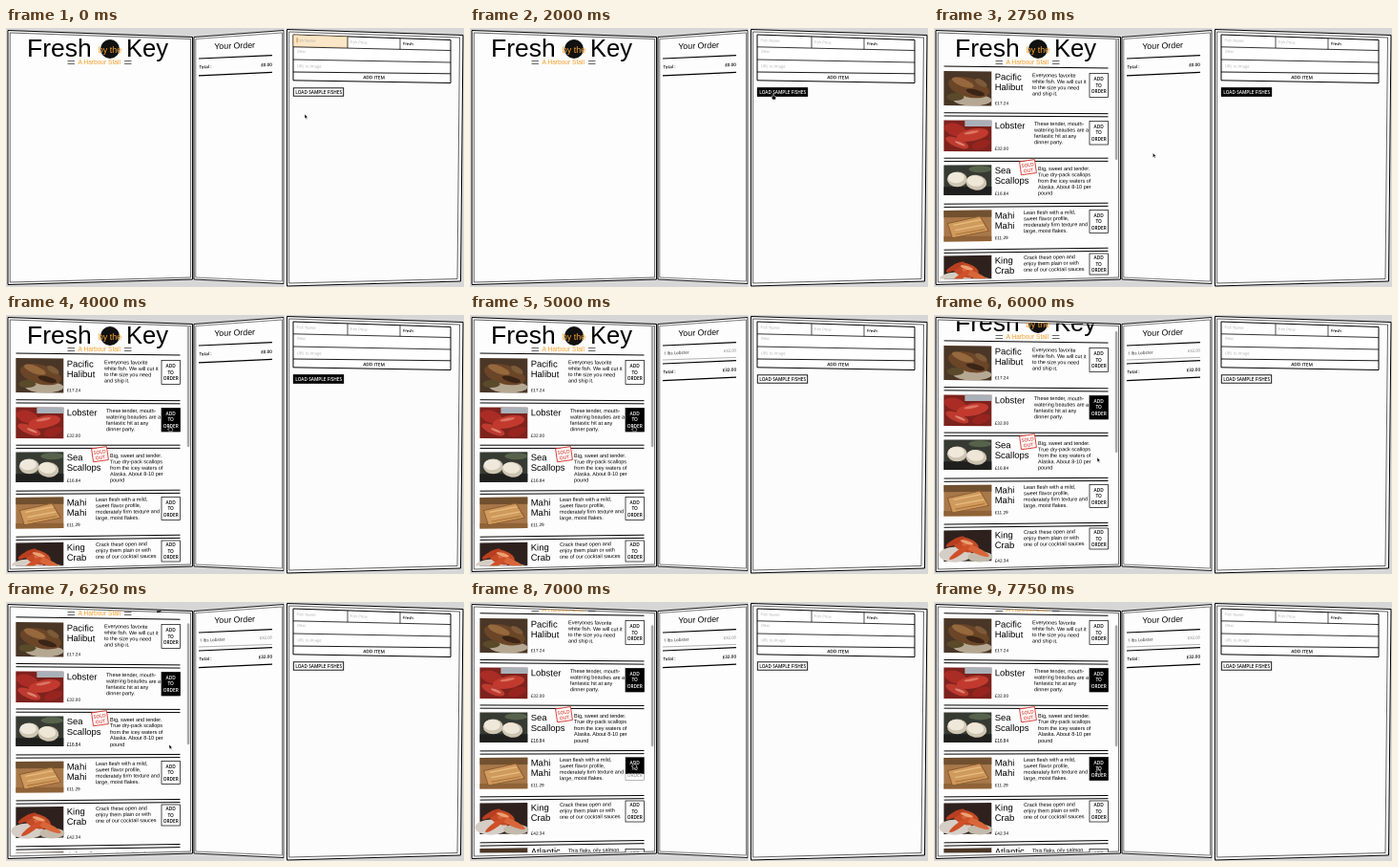
Animation, 480 px wide and 271 px high, one loop 8 s. Source, as an HTML page:

```html
<!DOCTYPE html>
<html lang="en">
<head>
<meta charset="utf-8">
<title>Fish shop</title>
<style>
html, body { margin: 0; height: 100%; overflow: hidden; background: #d6d6d6; }
svg { display: block; width: 100vw; height: 100vh; }
text { font-family: "Open Sans", sans-serif; white-space: pre; }
.h { font-family: "Liberation Sans", Arial, sans-serif; }
.b { font-weight: 600; }
.end { text-anchor: end; }
.mid { text-anchor: middle; }
</style>
</head>
<body>
<svg id="stage" viewBox="0 0 480 271"></svg>
<script>
const STEP = 250, STEPS = 32;
const ORANGE = '#f7a02c', RED = '#d9382f';

const text = (x, y, s, size, fill = '#000', cls = '', skew = 0) =>
  `<text class="${cls}" style="font-size:${size}px" fill="${fill}" transform="translate(${x} ${y}) skewY(${skew})">${s}</text>`;
const rect = (x, y, w, h, fill, stroke = 'none', sw = .7) =>
  `<rect x="${x}" y="${y}" width="${w}" height="${h}" fill="${fill}" stroke="${stroke}" stroke-width="${sw}"/>`;
const line = (x1, y1, x2, y2, w = 1, c = '#000') =>
  `<path d="M${x1} ${y1}L${x2} ${y2}" stroke="${c}" stroke-width="${w}"/>`;
const poly = (pts, fill, w, c = '#000') =>
  `<polygon points="${pts}" fill="${fill}" stroke="${c}" stroke-width="${w}"/>`;
const oval = (cx, cy, rx, ry, fill, turn = 0) =>
  `<ellipse rx="${rx}" ry="${ry}" fill="${fill}" transform="translate(${cx} ${cy}) rotate(${turn})"/>`;

// Piecewise linear value over [step, value...] keys
function track(keys, s) {
  const i = keys.findIndex(k => k[0] > s);
  if (i < 0) return keys[keys.length - 1].slice(1);
  const a = keys[i - 1], b = keys[i], p = (s - a[0]) / (b[0] - a[0]);
  return a.slice(1).map((v, j) => v + (b[j + 1] - v) * p);
}

const pointerPath = [
  [0, 313, 90], [2, 285, 86], [3, 262, 80], [5, 344, 86], [6, 317, 69], [10, 317, 69],
  [13, 54, 254], [15, 171, 66], [16, 171, 116], [20, 171, 116], [22, 171, 149],
  [27, 171, 149], [28, 171, 168], [31, 171, 174]
];
const scrollPath = [[0, 0], [23, 0], [24, 13], [25, 24], [26, 27], [27, 28]];

// Perspective of the left panel: rise per pixel of a row at height y
const slope = y => (135 - y) * .00012;
const degrees = y => Math.atan(slope(y)) * 180 / Math.PI;
const rowRule = (y, scroll) => {
  const d = slope(y - scroll) * 86;
  return line(10.5, y - d, 182.5, y + d);
};

// Dish pictures, each in a 50 by 36 box
const photos = [
  () => rect(0, 0, 50, 36, '#4a3626') + oval(30, 30, 20, 6, '#b5a892') + oval(26, 17, 22, 10, '#6b4527', 14) +
    oval(20, 12, 12, 4, '#96683d', 20) + oval(33, 22, 10, 3, '#3a2416', 14) + oval(12, 27, 9, 4, '#5a4a2a') +
    oval(39, 12, 7, 3, '#7d5a3a', 30),
  () => rect(0, 0, 50, 36, '#7d221d') + rect(22, 0, 28, 7, '#a9b0b8') + oval(12, 11, 12, 7, '#a92c25', 20) +
    oval(30, 17, 17, 7, '#c23a2e', -12) + oval(14, 26, 13, 5, '#bd3a2f', 25) + oval(39, 28, 10, 5, '#97241f', -20) +
    oval(29, 14, 8, 1.6, '#dd7562', -12) + oval(17, 27, 6, 1.4, '#df8170', 25),
  () => rect(0, 0, 50, 36, '#363a33') + rect(0, 26, 50, 10, '#1f201e') + oval(38, 5, 12, 4, '#56624b') +
    oval(14, 17, 10.5, 9, '#cfc5b2') + oval(13, 15, 8.5, 6.5, '#f0e9db') +
    oval(34, 21, 11, 9, '#cdc3b0', 10) + oval(33, 19, 9, 6.5, '#eee6d6', 10),
  () => rect(0, 0, 50, 36, '#a8784a') + rect(0, 0, 50, 8, '#70502f') + rect(0, 30, 50, 6, '#8f6237') +
    poly('4,15 38,7 47,24 9,32', '#cf9a5c', 1, '#8a5c30') +
    line(10, 17, 39, 11, 1.4, '#e6bd83') + line(12, 23, 42, 17, 1.4, '#e6bd83') + line(12, 28, 43, 22, 1, '#a66f38'),
  () => rect(0, 0, 50, 36, '#2e211d') + oval(12, 28, 17, 9, '#d5cec6') + oval(38, 31, 13, 6, '#c4b9ab') +
    oval(23, 17, 14, 8, '#c54a26', 20) + oval(33, 23, 16, 3.5, '#d8663a', 28) + oval(17, 25, 14, 3, '#cf5029', -38) +
    oval(12, 13, 11, 3, '#b83e20', -30) + oval(24, 14, 7, 2, '#eca073', 20)
];

// top: picture top, photo: picture height, x/y: first line of description, button: top and height
const dishes = [
  { name: ['Pacific', 'Halibut'], price: '£17.24', top: 45, photo: 36, base: 54.3, cost: 80.2, x: 103, y: 51.2, button: [47.5, 25],
    desc: ['Everyones favorite', 'white fish. We will cut it', 'to the size you need', 'and ship it.'] },
  { name: ['Lobster'], price: '£32.00', top: 96.5, photo: 32.5, base: 105.3, cost: 127.7, x: 105, y: 102, button: [97.5, 24.5],
    desc: ['These tender, mouth-', 'watering beauties are a', 'fantastic hit at any', 'dinner party.'] },
  { name: ['Sea', 'Scallops'], price: '£16.84', top: 143.5, photo: 31.5, base: 152.3, cost: 174.7, x: 109, y: 149,
    desc: ['Big, sweet and tender.', 'True dry-pack scallops', 'from the icey waters of', 'Alaska. About 8-10 per', 'pound'] },
  { name: ['Mahi', 'Mahi'], price: '£11.29', top: 191, photo: 32.5, base: 199.5, cost: 221.2, x: 94, y: 195, button: [190.5, 24],
    desc: ['Lean flesh with a mild,', 'sweet flavor profile,', 'moderately firm texture and', 'large, moist flakes.'] },
  { name: ['King', 'Crab'], price: '£42.34', top: 238.5, photo: 32.5, base: 246.5, cost: 271.7, x: 94, y: 242, button: [236, 22],
    desc: ['Crack these open and', 'enjoy them plain or with', 'one of our cocktail sauces'] },
  { name: ['Atlantic', 'Salmon'], price: '£14.53', top: 286, photo: 32, base: 292.5, cost: 318, x: 103, y: 290, button: [286.5, 22],
    desc: ['This flaky, oily salmon'] }
];

function addButton([y, h], fill) {
  const words = ['ADD', 'TO', 'ORDER'].map((w, i) => {
    const lit = fill > .3 + i * .25;
    return text(172.7, y + h / 2 - 4.8 + i * 6.5, w, 4.8, lit ? '#fff' : fill ? '#999' : '#000', 'b mid');
  });
  return rect(163, y, 19.5, h, '#fff', fill && fill < 1 ? '#999' : '#000') +
    rect(163, y, 19.5, h * fill, '#000') + words.join('');
}

function dish(d, i, fill, scroll) {
  const tilt = degrees(d.top + 16 - scroll);
  const rules = i ? [d.top - 7.3, d.top - 4.1] : [41];
  return rules.map(y => rowRule(y, scroll)).join('') +
    `<g transform="translate(10.3 ${d.top}) skewY(${tilt}) scale(1 ${d.photo / 36})">${photos[i % 5]()}</g>` +
    d.name.map((s, k) => text(63.7, d.base + k * 10.6, s, 9.5, '#000', 'h', tilt)).join('') +
    text(63.7, d.cost, d.price, 4.7, '#000', 'h', tilt) +
    d.desc.map((s, k) => text(d.x, d.y + k * 6.4, s, 5.5, '#000', 'h', tilt)).join('') +
    (d.button ? addButton(d.button, fill) :
      `<g transform="translate(98.5 145.7) rotate(-8)">${rect(-8, -7, 16, 14, '#fff', RED, .9)}` +
      text(0, -.6, 'SOLD', 5, RED, 'b mid') + text(0, 5.2, 'OUT', 5, RED, 'b mid') + '</g>');
}

function menu(s) {
  const scroll = track(scrollPath, s)[0];
  const fills = [s === 15 ? 1 : 0, s >= 16 ? 1 : 0, 0, s < 28 ? 0 : s === 28 ? .72 : 1, 0, 0];
  const head = text(22, 30.2, 'Fresh', 26.5, '#000', 'h') + text(126, 30.4, 'Key', 25.6, '#000', 'h') +
    oval(109, 22, 10, 10, '#111') + text(109, 25.5, 'by the', 9, ORANGE, 'h mid') +
    text(97.7, 38, 'A Harbour Stall', 6.6, ORANGE, 'h mid') +
    [64.5, 124].map(x => line(x, 34.5, x + 7.5, 34.5, .6) + line(x, 37.5, x + 7.5, 37.5, .6)).join('');
  const list = s >= 9 ? dishes.map((d, i) => dish(d, i, fills[i], scroll)).join('') : '';
  const bar = s >= 9 ? `<rect x="189.8" y="${11 + scroll * .47}" width="2.6" height="127" rx="1.3" fill="#a9a9a9"/>` : '';
  return `<clipPath id="view"><path d="M5 6L193 10V261.5L5 262.5Z"/></clipPath>
    <g clip-path="url(#view)"><g transform="translate(0 ${-scroll})">${head}${list}</g>${bar}</g>`;
}

function order(s) {
  const filled = s >= 18, drop = filled ? 18.8 : 0, tilt = -2.4;
  const total = filled ? '£32.00' : '£0.00';
  const rule = (y, w) => line(202, y, 279, y - 3.4, w);
  return text(218.3, 22.2, 'Your Order', 8.8, '#000', 'h', -2) + rule(32, 1.2) +
    (filled ? text(203, 41.7, '1 lbs Lobster', 4.45, '#222', '', tilt) +
      text(279, 38.5, '£32.00', 4.2, '#777', 'end', tilt) + line(202, 47, 279, 44.4, .5, '#666') + rule(51, 1.1) : '') +
    text(202.5, 42.5 + drop, 'Total :', 4.5, '#000', 'b', tilt) +
    text(279, 39.8 + drop, total, 4.6, '#000', 'b end', tilt) + rule(49.8 + drop, 1.2);
}

function inventory(s) {
  const focus = s < 7, fill = s < 6 || s >= 18 ? 0 : s === 6 ? .6 : 1;
  const grey = '#aaa';
  return poly('301,7 466,12.5 466,57.5 301,54.8', '#fff', 1) +
    (focus ? poly('301.5,7.5 358,9.3 358,20.3 301.5,19.2', '#fce6c8', .5, '#e9b978') : '') +
    line(301, 19.8, 466, 23.5, .8) + line(301, 33, 466, 36, .8) + line(301, 46, 466, 47.8, .9) +
    line(358, 9, 358, 21, .7) + line(413, 11, 413, 22.3, .7) +
    text(304.5, 14.3, 'Fish Name', 4.1, grey, '', 1.8) + text(360.5, 16.2, 'Fish Price', 4.1, grey, '', 1.8) +
    text(416, 17.8, 'Fresh', 4.1, '#000', 'b', 1.8) +
    text(305, 25.8, 'Desc', 4.1, grey, '', 1.2) + text(305, 41.2, 'URL to Image', 4.1, grey, '', 1) +
    text(385.5, 53.4, 'ADD ITEM', 4.8, '#000', 'b mid', .6) +
    (focus && s % 4 < 2 ? line(305, 10, 305, 15.5, .9, '#e88a1a') : '') +
    rect(301.3, 62.8, 52.4, 8.4, '#fff', '#000', .9) + rect(301, 62.4, 53, 9.2 * fill, '#000') +
    text(327.6, 68.8, 'LOAD SAMPLE FISHES', 4.75, fill ? '#fff' : '#000', 'b mid');
}

function pointer(s) {
  const [x, y] = track(pointerPath, s);
  const hand = (s >= 6 && s <= 10) || (s >= 15 && s <= 20) || s >= 28;
  const d = hand ? 'M0 0.3Q.7-.6 1.4.3V2L3.6 2.7V4.4L3 6H.4L-1.5 3.4-.7 2.9 0 3.5Z' : 'M0 0V4.8L1.1 3.8 1.9 5.6 2.7 5.2 2 3.5H3.5Z';
  return `<path d="${d}" transform="translate(${x} ${y})" fill="#000" stroke="#fff" stroke-width=".5"/>`;
}

const frame = poly('2,2.5 195.5,9.5 195.5,263 2,268.5', '#fdfdfd', 1) + poly('4.2,5 193.6,11.5 193.6,261 4.2,266', 'none', .6) +
  poly('197,9.5 291,2.5 291,267.5 197,263', '#fdfdfd', .9) + poly('198.8,11.5 289.4,5 289.4,265 198.8,261', 'none', .5) +
  poly('294.5,1.5 479,7.5 476.5,265 294.5,270', '#fcfcfc', 1) + poly('296.6,4 475.5,10 473,262.5 296.6,267', 'none', .6) +
  line(292.8, 0, 292.8, 271, 2.4, '#f4f4f4');

const stage = document.getElementById('stage');
let shown = -1;
function tick() {
  const s = Math.floor(performance.now() / STEP) % STEPS;
  if (s !== shown) {
    shown = s;
    stage.innerHTML = rect(0, 0, 480, 271, '#d6d6d6') + frame + menu(s) + order(s) + inventory(s) + pointer(s);
  }
  requestAnimationFrame(tick);
}
tick();
</script>
</body>
</html>
```
